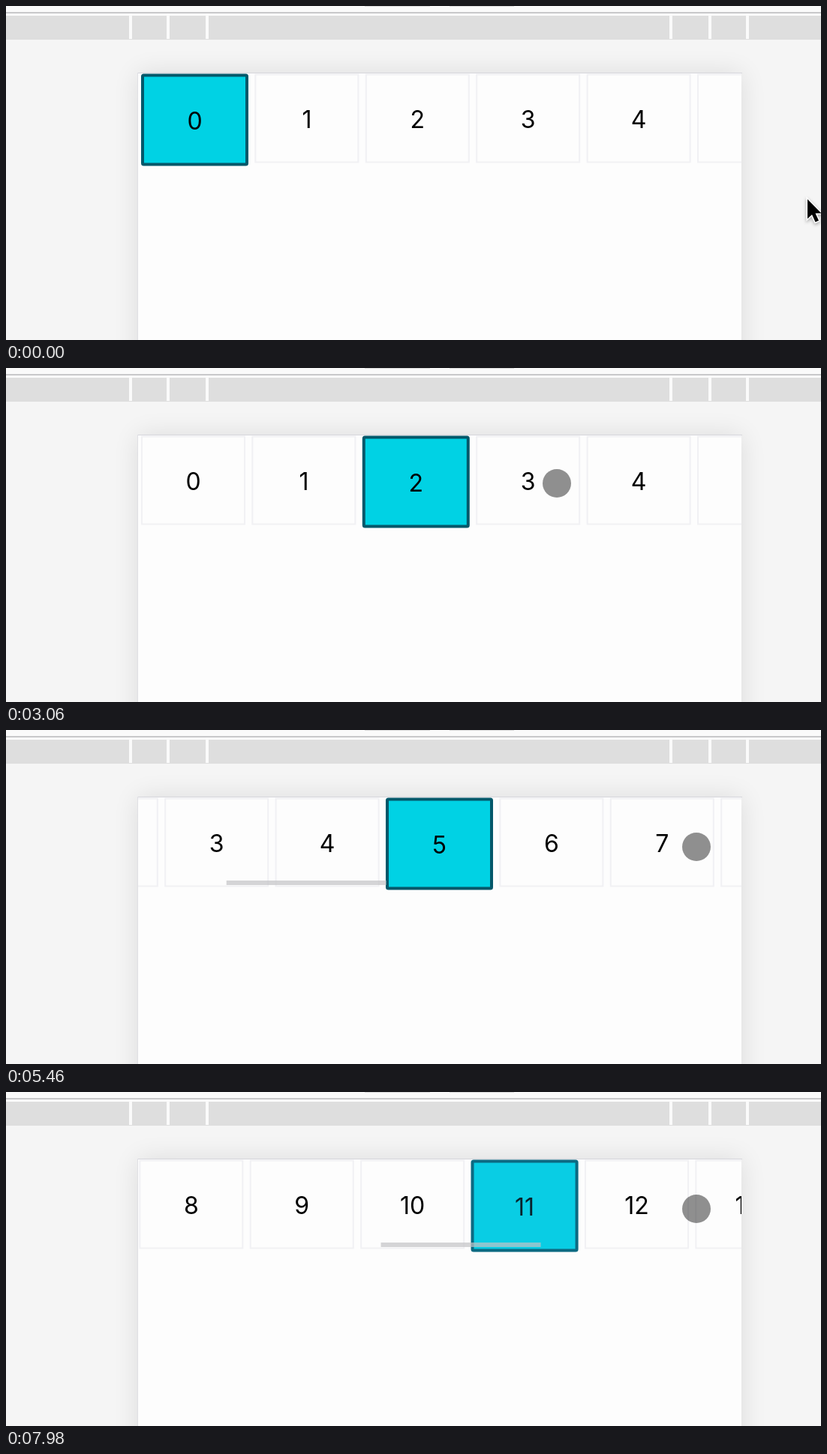
An HTML page with a canvas for the animation above (8000 ms loop, 1086 by 446 pixels).

```html
<!DOCTYPE html>
<html lang="en">
<head>
<meta charset="utf-8">
<title>Tile scroller</title>
<style>
  html, body { margin: 0; width: 100%; height: 100%; overflow: hidden; }
  canvas { display: block; }
</style>
</head>
<body>
<canvas id="stage" width="1086" height="446"></canvas>
<script>
const ctx = document.getElementById('stage').getContext('2d');
const LOOP = 8000;
const PANEL = { left: 176, right: 980, top: 90 };
const TILE = { first: 180, pitch: 147.4, width: 139, height: 119, grow: 4, count: 20 };
const SCROLL = { delay: 80, duration: 350 };

const taps = [
  { t: 1150, tile: 1 }, { t: 2250, tile: 2 }, { t: 3330, tile: 3 }, { t: 4420, tile: 5 },
  { t: 5560, tile: 7 }, { t: 6640, tile: 9 }, { t: 7699, tile: 11 }
];

// Pointer stops: time, x, y
const path = [
  [60, 1068, 258], [950, 432, 182], [1600, 432, 182], [1980, 522, 175], [2180, 572, 166],
  [2600, 572, 166], [3040, 734, 154], [3700, 734, 154], [4300, 897, 148],
  [4600, 897, 148], [5000, 920, 156]
];

const clamp = v => Math.max(0, Math.min(1, v));
const ease = p => p * p * (3 - 2 * p);
const lerp = (a, b, p) => a + (b - a) * p;
const centred = tile => Math.max(0, TILE.pitch * tile - 326);

function rect(x, y, w, h, color) {
  ctx.fillStyle = color;
  ctx.fillRect(x, y, w, h);
}

function disc(x, y, r, color) {
  ctx.fillStyle = color;
  ctx.beginPath();
  ctx.arc(x, y, r, 0, Math.PI * 2);
  ctx.fill();
}

function pointerAt(t) {
  const next = path.findIndex(stop => stop[0] > t);
  if (next === 0) return path[0].slice(1);
  if (next < 0) return path[path.length - 1].slice(1);
  const [t0, x0, y0] = path[next - 1], [t1, x1, y1] = path[next];
  const p = (t - t0) / (t1 - t0);
  return [lerp(x0, x1, p), lerp(y0, y1, p)];
}

function stateAt(t) {
  let selected = 0, scroll = 0, since = Infinity;
  for (const tap of taps) {
    if (t < tap.t) break;
    selected = tap.tile;
    since = t - tap.t;
    scroll = lerp(scroll, centred(tap.tile), ease(clamp((since - SCROLL.delay) / SCROLL.duration)));
  }
  return { selected, scroll, since };
}

function drawBackdrop() {
  rect(0, 0, 1086, 446, '#f5f5f5');
  rect(0, 0, 1086, 8, '#fafafa');
  rect(478, 0, 87, 1, '#dcdcdc');
  rect(591, 0, 86, 1, '#dcdcdc');
  rect(0, 8, 1086, 2, '#c8c8ca');
  rect(0, 10, 1086, 3, '#fbfbfb');
  rect(0, 13, 1086, 32, '#dedede');
  for (const x of [164, 214, 266, 884, 936, 986]) rect(x, 13, 4, 31, '#fafafa');

  ctx.save();
  ctx.beginPath();
  ctx.rect(0, 45, 1086, 401);
  ctx.clip();
  ctx.shadowColor = 'rgba(0, 0, 0, 0.11)';
  ctx.shadowBlur = 32;
  rect(PANEL.left, PANEL.top, PANEL.right - PANEL.left, 420, '#fdfdfd');
  ctx.restore();
  rect(175, 89, 806, 1, '#d6d6dc');
  rect(175, 89, 1, 357, '#e0e0e4');
}

function drawTile(index, { selected, scroll, since }) {
  const active = index === selected;
  const x = TILE.first + index * TILE.pitch + (index > selected ? TILE.grow : 0) - scroll;
  const w = TILE.width + (active ? TILE.grow : 0);
  const h = TILE.height + (active ? TILE.grow : 0);
  if (x > PANEL.right || x + w < PANEL.left) return;

  ctx.lineWidth = active ? 4 : 2;
  const half = ctx.lineWidth / 2;
  ctx.fillStyle = active ? '#00d2e4' : '#fdfdfd';
  ctx.strokeStyle = active ? '#04586a' : '#f1f1f4';
  ctx.beginPath();
  ctx.roundRect(x + half, 90.5 + half, w - 2 * half, h - 2 * half, active ? 1.5 : 0);
  ctx.fill();
  ctx.stroke();

  ctx.fillStyle = '#000';
  ctx.fillText(index, x + w / 2, active ? 164.5 : 162.5);

  if (active && since < 450) {
    const alpha = 0.4 * (1 - clamp((since - 100) / 350));
    ctx.beginPath();
    ctx.roundRect(x, 90.5, w, h, 3);
    ctx.fillStyle = `rgba(51, 181, 229, ${alpha})`;
    ctx.fill();
  }
}

function drawPointer(t, since) {
  const [x, y] = pointerAt(t);
  if (x > PANEL.right) {
    ctx.save();
    ctx.translate(x, y);
    ctx.shadowColor = 'rgba(0, 0, 0, 0.35)';
    ctx.shadowBlur = 4;
    ctx.shadowOffsetY = 2;
    const arrow = new Path2D('M0 0V26L6 20.5L10.5 30.5L15 28.5L10.5 18.8H18.5Z');
    ctx.lineWidth = 3;
    ctx.strokeStyle = '#fff';
    ctx.stroke(arrow);
    ctx.shadowColor = 'transparent';
    ctx.fillStyle = '#000';
    ctx.fill(arrow);
    ctx.restore();
    return;
  }
  if (since < 120) {
    ctx.beginPath();
    ctx.arc(x, y, 21, 0, Math.PI * 2);
    ctx.lineWidth = 4;
    ctx.strokeStyle = 'rgba(255, 255, 255, 0.38)';
    ctx.stroke();
  }
  ctx.globalCompositeOperation = 'multiply';
  disc(x, y, 19, '#909090');
  ctx.globalCompositeOperation = 'source-over';
}

function render(t) {
  const state = stateAt(t);
  drawBackdrop();
  ctx.font = '32px Inter, Roboto, sans-serif';
  ctx.textAlign = 'center';
  ctx.save();
  ctx.beginPath();
  ctx.rect(PANEL.left, PANEL.top, PANEL.right - PANEL.left, 356);
  ctx.clip();
  for (let i = 0; i < TILE.count; i++) drawTile(i, state);
  if (state.scroll > 0) rect(184 + state.scroll * 0.267, 201, 213, 6, 'rgba(195, 195, 198, 0.7)');
  ctx.restore();
  drawPointer(t, state.since);
}

const start = performance.now();
function tick() {
  render((performance.now() - start) % LOOP);
  requestAnimationFrame(tick);
}
tick();
</script>
</body>
</html>
```
